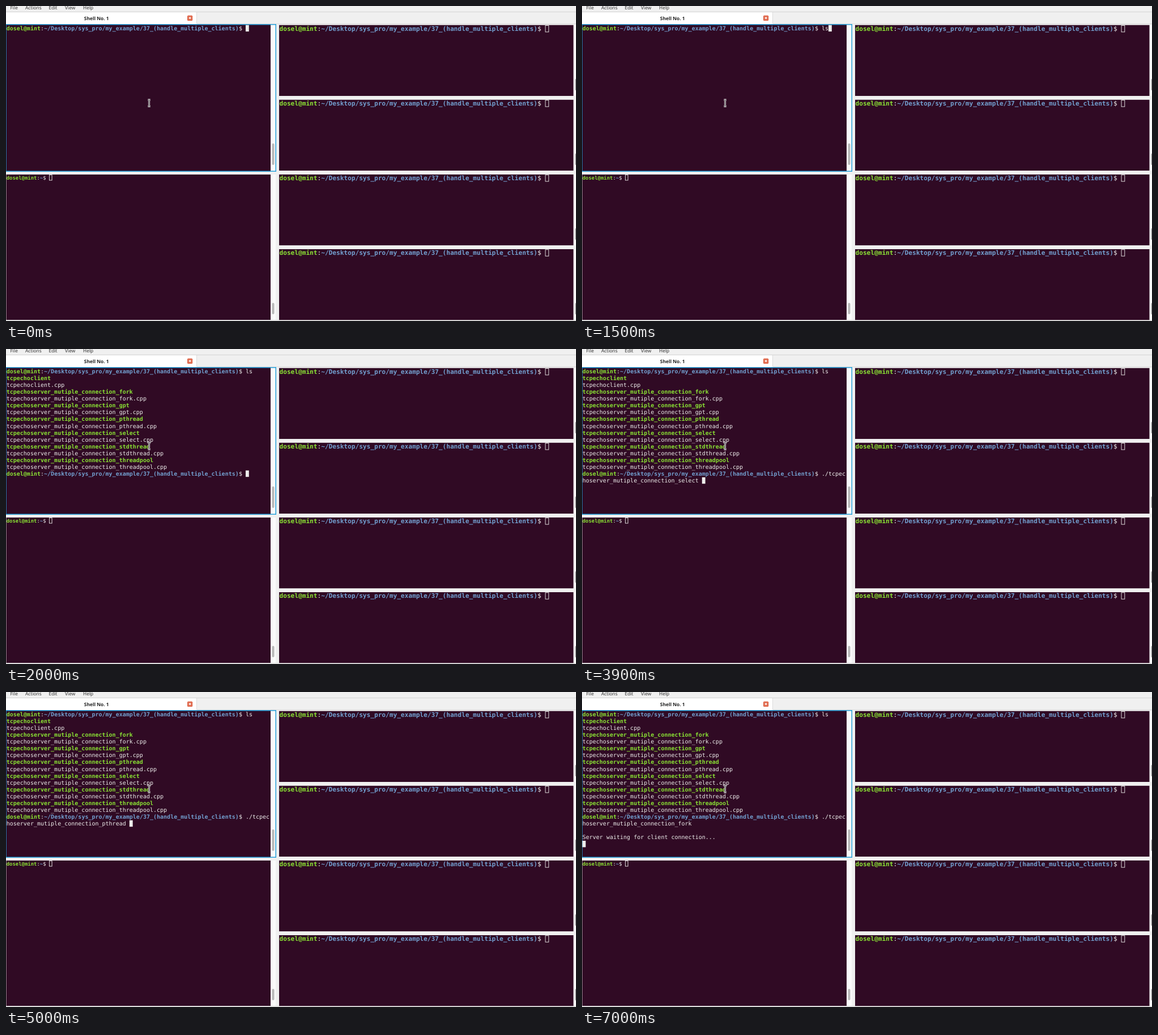
An HTML page for the animation above (8000 ms loop, 1006 px wide and 557 px high).

```html
<!DOCTYPE html>
<html lang="en">
<head>
<meta charset="utf-8">
<title>Split terminal</title>
<style>
  html, body { margin: 0; width: 100%; height: 100%; overflow: hidden; background: #f0f0f0; }
  svg { display: block; width: 1006px; height: 557px; }
  text { text-rendering: geometricPrecision; white-space: pre; }
  .ui { font: 8.4px "Noto Sans", sans-serif; fill: #333; }
  .tab { font-weight: 700; text-anchor: middle; fill: #222; }
  .term { font-family: "DejaVu Sans Mono", monospace; fill: #eeeeec; }
  .user { font-weight: 700; fill: #8ae234; }
  .path { font-weight: 700; fill: #729fcf; }
</style>
</head>
<body>
<svg id="stage" viewBox="0 0 1006 557"></svg>
<script>
const DURATION = 8000;
const USER = "dosel@mint";
const FOLDER = "~/Desktop/sys_pro/my_example/37_(handle_multiple_clients)";
const stage = document.getElementById("stage");

function add(parent, tag, attrs, content = "") {
  const node = document.createElementNS("http://www.w3.org/2000/svg", tag);
  for (const [key, value] of Object.entries(attrs)) node.setAttribute(key, value);
  node.textContent = content;
  parent.append(node);
  return node;
}
const rect = (x, y, width, height, fill, rx = 0) =>
  add(stage, "rect", { x, y, width, height, fill, rx });
const label = (x, y, text, cls = "ui") => add(stage, "text", { x, y, class: cls }, text);

// A line is a list of [text, class] runs.
const prompt = (folder, command = "") =>
  [[USER, "user"], [":", ""], [folder, "path"], ["$ " + command, ""]];

function drawLine(parent, runs, x, y, size) {
  let column = 0;
  for (const [text, cls] of runs) {
    add(parent, "text", {
      x: x + column * size * 0.602, y, class: "term " + cls, "font-size": size
    }, text);
    column += text.length;
  }
}

const hollowCursor = (x, y, width, height) =>
  add(stage, "rect", { x, y, width, height, fill: "none", stroke: "#eeeeec", "stroke-width": 0.9 });

// Menu and tab bar
["File", "Actions", "Edit", "View", "Help"].forEach((name, i) =>
  label([7.5, 34, 75.5, 104, 136][i], 6, name));
rect(0, 10, 1006, 1, "#d4d4d4");
rect(0, 11, 336, 21, "#fff");
rect(336, 11, 1, 20, "#dcdcdc");
rect(337, 31, 669, 1, "#dcdcdc");
label(159.7, 24.6, "Shell No. 1", "ui tab");
rect(320, 16.7, 9.2, 9.2, "#df6548", 1.5);
add(stage, "path", {
  d: "M322.7 19.4l3.8 3.8m0-3.8l-3.8 3.8", stroke: "#fff", "stroke-width": 1.2
});

// Left panes
const PURPLE = "#300a24", THUMB = "#b9b9b9";
rect(0, 32, 477, 261, "#27a0da");
rect(467, 33.5, 8.5, 258, "#fafafa");
rect(0.7, 33.5, 466.3, 258, PURPLE);
rect(469.5, 243, 4, 38, THUMB, 2);
rect(467, 298, 9, 257, "#fafafa");
rect(0.5, 298, 466.5, 257, PURPLE);
rect(469.5, 525, 4, 20, THUMB, 2);
drawLine(stage, prompt("~"), 0.7, 306.8, 8.93);
hollowCursor(76.5, 298.7, 4.6, 9.4);

// Right panes
for (let y = 33.7; y < 500; y += 132.1) {
  rect(1001.5, y, 4.5, 125.3, "#fafafa");
  rect(482, y, 519.5, 125.3, PURPLE);
  rect(1004, y + 95, 4, 20.5, THUMB, 2);
  drawLine(stage, prompt(FOLDER), 482.5, y + 10.1, 11.13);
  hollowCursor(952, y + 0.8, 5.8, 11.4);
}
rect(0, 555.5, 1006, 1, "#d0d0d0");

// Active terminal
const active = add(stage, "g", {});
const SIZE = 10.02, CELL = SIZE * 0.602, LINE = 12.07;
const plain = text => [[text, ""]];
const server = "tcpechoserver_mutiple_connection_";
const listing = ["tcpechoclient", ...["fork", "gpt", "pthread", "select", "stdthread", "threadpool"]
  .map(kind => server + kind)]
  .flatMap(name => [[[name, "user"]], plain(name + ".cpp")]);
const listed = command => [prompt(FOLDER, "ls"), ...listing, prompt(FOLDER, command)];
const launch = kind => [...listed("./tcpec"), plain(`hoserver_mutiple_connection_${kind} `)];

const steps = [
  [0, [prompt(FOLDER)]],
  [1300, [prompt(FOLDER, "l")]],
  [1500, [prompt(FOLDER, "ls")]],
  [2000, listed("")],
  [3600, listed("./")],
  [3900, launch("select")],
  [5000, launch("pthread")],
  [5500, launch("fork")],
  [7000, [...launch("fork"), [], plain("Server waiting for client connection..."), []]]
];

function drawScreen(lines) {
  active.replaceChildren();
  lines.forEach((runs, row) => drawLine(active, runs, 0.7, 43 + row * LINE, SIZE));
  const column = lines.at(-1).reduce((sum, [text]) => sum + text.length, 0);
  add(active, "rect", {
    x: 0.7 + column * CELL, y: 33.7 + (lines.length - 1) * LINE,
    width: CELL - 0.2, height: 11.4, fill: "#eeeeec"
  });
}

// Mouse pointer
const beam = "M250.4 165.9h1.5l.7.6.7-.6h1.5M252.6 166.5v10.2M250.4 177.3h1.5l.7-.6.7.6h1.5";
for (const [stroke, width] of [["#fff", 2.8], ["#1a1016", 1]])
  add(stage, "path", { d: beam, fill: "none", stroke, "stroke-width": width });

let shown = null;
const start = performance.now();
function tick() {
  const time = (performance.now() - start) % DURATION;
  const step = steps.findLast(([at]) => at <= time);
  if (step !== shown) drawScreen((shown = step)[1]);
  requestAnimationFrame(tick);
}
tick();
</script>
</body>
</html>
```
